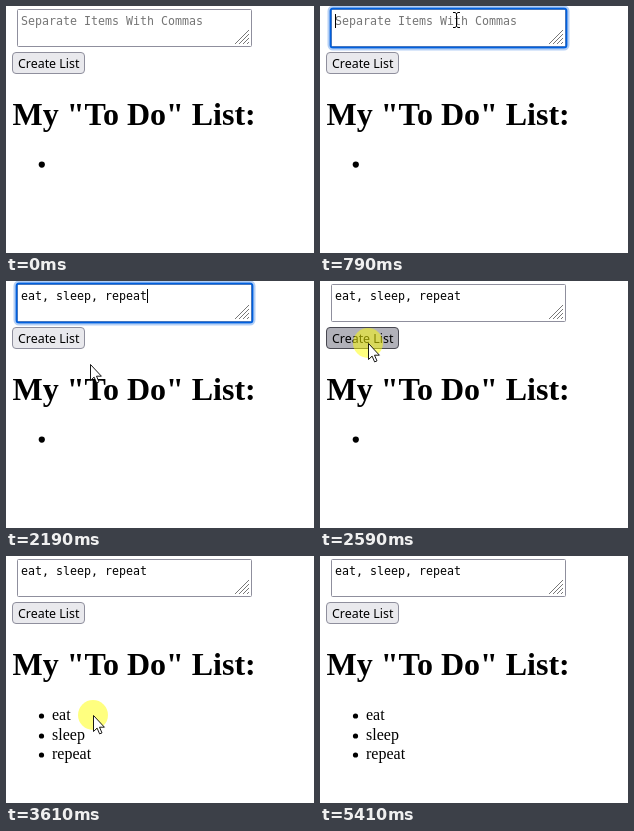
Recreate the animation shown at these times as an HTML page. Size 308 px wide and 247 px high, loop 6210 ms.

```html
<!DOCTYPE html>
<html lang="en">
<head>
<meta charset="utf-8">
<title>To-do list</title>
<style>
  html, body { margin: 0; width: 100%; height: 100%; overflow: hidden; background: #fff; }
  svg { display: block; width: 308px; height: 247px; }
  text { white-space: pre; }
  .mono { font: 11.63px "DejaVu Sans Mono", monospace; }
  .label { font: 12.4px "Noto Sans", "Open Sans", sans-serif; }
  .title { font: bold 32px "Liberation Serif", "Times New Roman", serif; }
  .item { font: 16px "Liberation Serif", "Times New Roman", serif; }
</style>
</head>
<body>
<svg viewBox="0 0 308 247">
  <rect x="11.5" y="3.5" width="234" height="37" rx="1" fill="#fff" stroke="#8f8f9d"/>
  <g id="focus" fill="none">
    <rect x="8.5" y="0.5" width="240" height="43" rx="4.5" stroke="#b5d0f5" stroke-width="2"/>
    <rect x="10.5" y="2.5" width="236" height="39" rx="2.5" stroke="#0060df" stroke-width="2"/>
  </g>
  <path d="M229 38L243 24M233 38L243 28M237 38L243 32M241 38L243 36" stroke="#777" fill="none"/>
  <text id="field" class="mono" x="15" y="19"></text>
  <path id="caret" stroke="#000"/>

  <rect id="button" x="6.5" y="46.5" width="72" height="21" rx="3.5"/>
  <text class="label" x="12" y="62">Create List</text>

  <text class="title" x="6.5" y="119">My "To Do" List:</text>
  <circle id="dot" cx="35.8" cy="158.6" r="3.1"/>
  <g id="list" class="item"></g>

  <circle id="click" r="15" fill="#ff0" fill-opacity=".5"/>
  <path id="beam" d="M-3 -7.5H-1L0.5 -6.5L2 -7.5H4M0.5 -6.5V6.5M-3 7.5H-1L0.5 6.5L2 7.5H4" fill="none" stroke="#000"/>
  <path id="arrow" d="M0.5 0.5V16.5L4.1 13.1L6.6 18.9L9 17.9L6.5 12.2H11.4Z" fill="#fff" stroke="#000" stroke-width=".9"/>
</svg>
<script>
const LOOP = 6210;
const CHAR = 7;
const HINT = "Separate Items With Commas";
const ENTRY = "eat, sleep, repeat";
const BUTTON = {
  idle: ["#e9e9ed", "#8f8f9d"],
  hover: ["#d0d0d7", "#676774"],
  down: ["#b1b1b9", "#484851"]
};

// Each step: start time and the values that change from then on.
const steps = [
  [0, { typed: "", focus: false, caret: false, button: "idle", listed: false, pointer: null, x: 0, y: 0, click: false }],
  [200, { pointer: "beam", x: 186, y: 11 }],
  [400, { x: 150, y: 13 }],
  [590, { x: 136, y: 14, focus: true, caret: true, click: true }],
  [790, { click: false }],
  [990, { caret: false }],
  [1190, { caret: true }],
  [1390, { typed: ENTRY.slice(0, 10), pointer: null }],
  [1590, { typed: ENTRY, pointer: "arrow", x: 127, y: 82 }],
  [1780, { x: 119, y: 93 }],
  [1980, { x: 104, y: 91 }],
  [2190, { x: 84, y: 83 }],
  [2390, { x: 63, y: 71 }],
  [2590, { x: 48, y: 62, focus: false, caret: false, button: "down", click: true }],
  [2790, { button: "hover", listed: true, click: false }],
  [2990, { x: 57, y: 82, button: "idle" }],
  [3190, { x: 70, y: 113 }],
  [3410, { x: 82, y: 143 }],
  [3610, { x: 87, y: 159, click: true }],
  [3810, { click: false }],
  [4010, { y: 183 }],
  [4410, { x: 90, y: 188 }],
  [4610, { x: 95, y: 194 }],
  [4810, { x: 101, y: 199 }],
  [5010, { x: 162, y: 212 }],
  [5210, { x: 260, y: 232 }],
  [5410, { pointer: null }]
];

const states = [];
steps.forEach(([, change], i) => states.push({ ...states[i - 1], ...change }));

const el = id => document.getElementById(id);
const show = (id, on) => { el(id).style.display = on ? "" : "none"; };

el("list").innerHTML = ENTRY.split(", ").map((word, i) => {
  const y = 164 + Math.round(i * 19.6);
  return `<circle cx="35.5" cy="${y - 4}" r="2.6"/><text x="46" y="${y}">${word}</text>`;
}).join("");

function draw(s) {
  el("field").textContent = s.typed || HINT;
  el("field").setAttribute("fill", s.typed ? "#000" : "#757575");
  el("caret").setAttribute("d", `M${15.5 + s.typed.length * CHAR} 8V22`);
  const [fill, line] = BUTTON[s.button];
  el("button").setAttribute("fill", fill);
  el("button").setAttribute("stroke", line);
  show("focus", s.focus);
  show("caret", s.caret);
  show("dot", !s.listed);
  show("list", s.listed);
  show("click", s.click);
  show("beam", s.pointer === "beam");
  show("arrow", s.pointer === "arrow");
  for (const id of ["click", "beam", "arrow"]) {
    el(id).setAttribute("transform", `translate(${s.x} ${s.y})`);
  }
}

const start = performance.now();
let current = -1;

function tick(now) {
  const t = Math.max(0, now - start) % LOOP;
  let i = steps.length - 1;
  while (steps[i][0] > t) i--;
  if (i !== current) draw(states[current = i]);
  requestAnimationFrame(tick);
}
tick(start);
</script>
</body>
</html>
```
